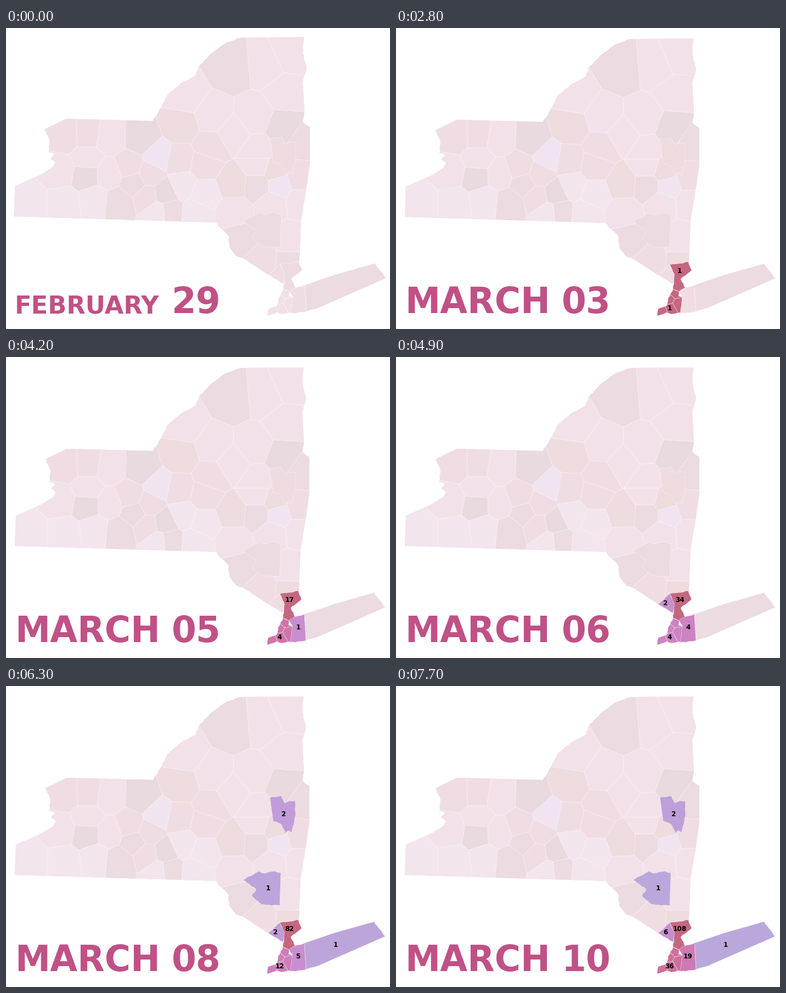
These frames come from a looping animation (700x548 px, 8000 ms). A matplotlib script:

```python
import matplotlib.pyplot as plt
import numpy as np
from matplotlib.animation import FuncAnimation
from matplotlib.colors import LinearSegmentedColormap
from matplotlib.patches import Polygon

W, H, DPI = 700, 548, 100
TICK, DAY, LOOP = 100, 700, 8000
PX = 72 / DPI
DATE_COLOR = "#c05186"
BORDER = (1, 1, 1, 0.5)
HEAT = LinearSegmentedColormap.from_list(
    "heat", ["#baa8dc", "#c498d8", "#cd86c8", "#d06e9d", "#c56780"])

# County centres by fill; borders run halfway between neighbouring centres.
CENTRES = {
    "#e9dadf": [(147, 270), (248, 203), (290, 302), (506, 184)],
    "#ecdbe1": [(207, 318), (234, 284), (298, 335), (412, 75), (540, 208),
                (458, 287), (427, 385)],
    "#f0dde3": [(111, 197), (149, 196), (226, 254), (262, 268), (257, 307),
                (315, 242), (374, 218), (362, 252), (534, 275), (465, 425)],
    "#eedcdf": [(318, 180), (413, 284), (490, 262), (518, 430)],
    "#f3e1e9": [(100, 262), (149, 240), (188, 202), (188, 268), (326, 126),
                (377, 162), (413, 195), (452, 163), (472, 70), (517, 50),
                (510, 120), (458, 226), (458, 252), (415, 335), (485, 320),
                (535, 316), (519, 386)],
    "#f2e5ee": [(43, 320), (109, 320), (161, 313), (278, 337), (322, 287),
                (362, 302), (345, 338)],
    "#efe4f0": [(278, 235), (497, 287)],
}

MAINLAND = [
    (16, 344), (18, 289), (63, 269), (85, 256), (91, 246), (82, 239), (90, 231),
    (79, 227), (81, 206), (72, 186), (111, 167), (268, 171), (282, 148),
    (296, 122), (319, 103), (346, 88), (351, 73), (375, 48), (402, 29),
    (428, 20), (542, 19), (540, 48), (547, 74), (540, 100), (543, 152),
    (540, 172), (553, 182), (553, 248), (546, 297), (537, 350), (534, 426),
    (499, 431), (478, 450), (434, 421), (420, 416), (407, 400), (406, 380),
    (388, 363), (383, 355),
]

# Counties that report cases: fill before the first case, then the outline.
REPORTING = {
    "City": ("#f1e0e7", [
        (505, 475), (516, 480), (515, 488), (522, 490), (519, 518), (502, 521),
        (493, 518), (476, 524), (478, 511), (493, 506), (496, 492)]),
    "Westchester": ("#ecdbe1", [
        (499, 431), (533, 426), (539, 441), (519, 457), (527, 473), (516, 480),
        (505, 475), (507, 448)]),
    "Nassau": ("#f0dde3", [
        (516, 480), (525, 474), (544, 468), (547, 516), (518, 520), (522, 489)]),
    "Rockland": ("#f0dde3", [(499, 431), (478, 450), (505, 466), (507, 448)]),
    "Saratoga": ("#eedcdf", [
        (481, 203), (502, 200), (508, 213), (518, 209), (527, 209), (528, 235),
        (521, 267), (515, 263), (509, 268), (502, 252), (487, 246)]),
    "Ulster": ("#ecdbe1", [
        (432, 353), (461, 337), (470, 341), (490, 337), (501, 340), (499, 400),
        (466, 398), (448, 382), (456, 370)]),
    "Suffolk": ("#ecdbe1", [
        (544, 468), (600, 449), (671, 429), (691, 456), (570, 509), (547, 516)]),
}
BOROUGHS = [(509, 482), (497, 494), (514, 503), (501, 510), (485, 516)]

LABEL_AT = {"City": (499, 510), "Westchester": (517, 442), "Nassau": (532.5, 492),
            "Rockland": (491, 448), "Saratoga": (506, 233), "Ulster": (478, 368),
            "Suffolk": (601, 471)}

# Confirmed cases per day, in the order of LABEL_AT
CASES = [
    (),
    (1,),
    (1,),
    (1, 1),
    (1, 10),
    (4, 17, 1),
    (4, 34, 4, 2),
    (11, 70, 4, 2, 2),
    (12, 82, 5, 2, 2, 1, 1),
    (19, 98, 17, 4, 2, 1, 1),
    (36, 108, 19, 6, 2, 1, 1),
]

rng = np.random.default_rng(4)


def rough(corners, step=5, depth=0.8):
    """Fray the natural, short edges; long surveyed borders stay straight."""
    points = []
    for start, end in zip(corners, corners[1:] + corners[:1]):
        start, end = np.array(start, float), np.array(end, float)
        length = np.hypot(*(end - start))
        points.append(start)
        if length < 40:
            for t in np.arange(step, length - step / 2, step) / length:
                points.append(start + (end - start) * t
                              + rng.uniform(-depth, depth, 2))
    return points


def keep_nearer(polygon, centre, other):
    """Cut away the part of a polygon that lies closer to the other centre."""
    normal = other - centre
    middle = (other + centre) / 2
    kept = []
    for a, b in zip(polygon, polygon[1:] + polygon[:1]):
        da, db = np.dot(a - middle, normal), np.dot(b - middle, normal)
        if da <= 0:
            kept.append(a)
        if da * db < 0:
            kept.append(a + (b - a) * da / (da - db))
    return kept


def cells(centres):
    centres = np.array(centres, float)
    stage = [np.array(p, float) for p in [(0, 0), (W, 0), (W, H), (0, H)]]
    for centre in centres:
        cell = stage
        for other in centres:
            if other is not centre and np.any(other != centre):
                cell = keep_nearer(cell, centre, other)
        yield cell


fig = plt.figure(figsize=(W / DPI, H / DPI), dpi=DPI, facecolor="white")
ax = fig.add_axes([0, 0, 1, 1])
ax.axis("off")


def area(points, fill, border="none", clip=None):
    patch = Polygon(points, fc=fill, ec=border, lw=0.5, joinstyle="round")
    ax.add_patch(patch)
    if clip:
        patch.set_clip_path(clip)
    return patch


mainland = area(rough(MAINLAND), "#f3e1e9")
fills = [fill for fill, group in CENTRES.items() for _ in group]
for fill, cell in zip(fills, cells(sum(CENTRES.values(), []))):
    area(cell, fill, BORDER, mainland)

reporting = {name: area(rough(corners), fill, BORDER)
             for name, (fill, corners) in REPORTING.items()}
for cell in cells(BOROUGHS):
    area(cell, "none", BORDER, reporting["City"])


def date_text(x, size):
    return fig.text(x / W, 1 - 519.5 / H, "", fontsize=size * PX,
                    family="DejaVu Sans", weight="bold", color=DATE_COLOR)


month = date_text(16, 64.5)
day_number = date_text(302, 64.5)
labels = {name: ax.text(x, y + 4.4, "", fontsize=12 * PX, ha="center",
                        family="DejaVu Sans", weight="bold")
          for name, (x, y) in LABEL_AT.items()}


def zoom_map(scale, cx=354, cy=525):
    ax.set_xlim(cx - cx / scale, cx + (W - cx) / scale)
    ax.set_ylim(cy + (H - cy) / scale, cy - cy / scale)


def draw(frame):
    # The opening day is held twice as long as the others.
    day = max(0, frame * TICK // DAY - 1)
    counts = dict(zip(LABEL_AT, CASES[day]))
    peak = max(counts.values(), default=1)

    # Before the first case the map is a touch larger.
    zoom_map(1 if day else 1.005)
    for name, patch in reporting.items():
        count = counts.get(name)
        # The colour scale spans two decades below the day's maximum.
        patch.set_facecolor(HEAT(1 + np.log10(count / peak) / 2) if count
                            else REPORTING[name][0])
        labels[name].set_text(str(count or ""))

    month.set_text("MARCH" if day else "FEBRUARY")
    month.set_fontsize((64.5 if day else 44.8) * PX)
    day_number.set_text(f"{day or 29:02d}")
    return []


animation = FuncAnimation(fig, draw, frames=LOOP // TICK, interval=TICK,
                          init_func=lambda: draw(0), repeat=True,
                          repeat_delay=0)
plt.show()
```
